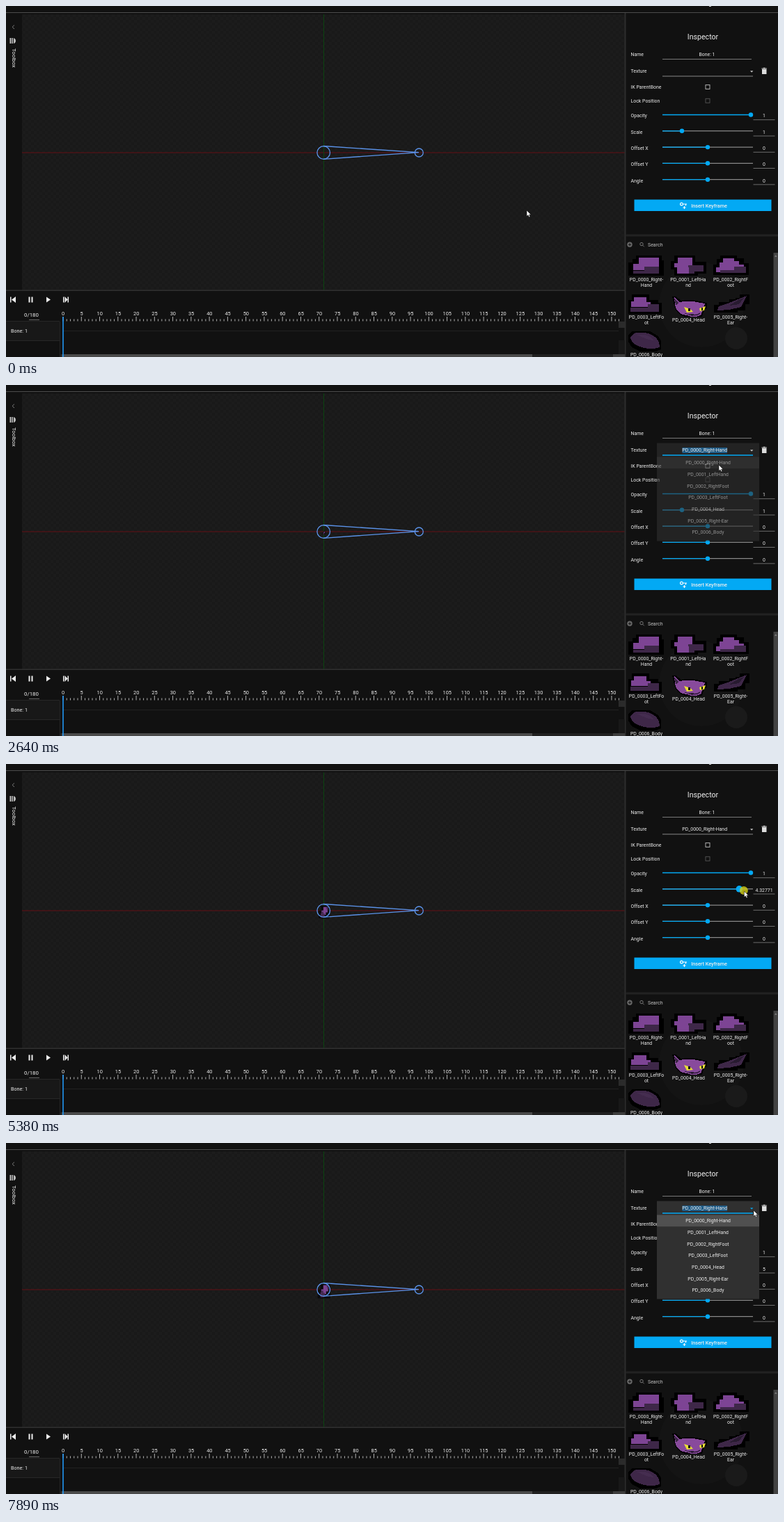
An HTML page for the animation above (8 s loop, 1109 by 505 pixels).

```html
<!DOCTYPE html>
<html lang="en">
<head>
<meta charset="utf-8">
<title>Bone editor</title>
<style>
html, body { margin: 0; width: 100%; height: 100%; overflow: hidden; background: #111; }
svg { display: block; width: 100vw; height: 100vh; font-family: Roboto, Arial, sans-serif; }
</style>
</head>
<body>
<svg id="stage" viewBox="0 0 1109 505">
  <defs>
    <pattern id="check" width="8" height="8" patternUnits="userSpaceOnUse">
      <path d="M0 0h8v8h-8z" fill="#1c1c1c"/>
      <path d="M0 0h4v4h-4zM4 4h4v4h-4z" fill="#191919"/>
    </pattern>
  </defs>
  <g id="view"></g>
  <g id="hand">
    <path d="M-9-2h4v-8h14v21h-18z" fill="#0b0a0c"/>
    <path d="M-4-2h3v-6h7v9h-3v4h-3v4h-5v-6h1z" fill="#7b4390"/>
    <path d="M-4 0h3v3h2v6h-6v-5h1zM4-8h3v6h-2v-3h-1z" fill="#442a50"/>
  </g>
  <g id="ui"></g>
  <g id="live"></g>
</svg>
<script>
const LOOP = 8000, BLUE = '#03a9f4', LIGHT = '#7d4494', DARK = '#3e2748';
const $ = id => document.getElementById(id);

const rect = (x, y, w, h, fill, more = '') =>
  `<rect x="${x}" y="${y}" width="${w}" height="${h}" fill="${fill}" ${more}/>`;
const circle = (x, y, r, fill, more = '') =>
  `<circle cx="${x}" cy="${y}" r="${r}" fill="${fill}" ${more}/>`;
const shape = (d, fill, more = '') => `<path d="${d}" fill="${fill}" ${more}/>`;
const line = (d, color, width = 1) => shape(d, 'none', `stroke="${color}" stroke-width="${width}"`);
const text = (s, x, y, size = 6.9, anchor = 'middle', more = '') =>
  `<text x="${x}" y="${y}" font-size="${size}" text-anchor="${anchor}" fill="#eee" ${more}>${s}</text>`;

const names = ['PD_0000_Right-Hand', 'PD_0001_LeftHand', 'PD_0002_RightFoot', 'PD_0003_LeftFoot',
  'PD_0004_Head', 'PD_0005_Right-Ear', 'PD_0006_Body'];

function slider(y, x, value, r = 3.2) {
  return line(`M943 ${y}H1073`, '#a5a5a5') + line(`M943 ${y}H${x}`, BLUE, 1.3) +
    circle(x, y, r, BLUE) + text(value, 1089, y + 3.8) + line(`M1073.5 ${y + 7.2}H1104.5`, '#777', .9);
}

function viewport() {
  return rect(23, 12, 866, 397, 'url(#check)') +
    line('M23 211H889', '#650f15') + line('M456.5 12V409', '#0b4510');
}

function frameAndTools() {
  return line('M0 9.5H1109', '#4c4c4c') + rect(1010, 0, 3, 1, '#ccc') +
    rect(888.5, 10, 2, 495, '#2d2d2d') + rect(0, 408.5, 889, 1.5, '#303030') +
    line('M12 27.5L9 30.3L12 33', '#777') +
    shape('M5.5 46h2v8h-2zM8.5 46h1.5v8h-1.5zM11 46q3 1 3 4t-3 4z', '#bbb') +
    text('Toolbox', 0, 0, 7.8, 'start', 'transform="translate(9 61) rotate(90)"');
}

function bone() {
  return line('M456 201.5L593 210.7L456 220.3', '#5b93ea', 1.3) +
    circle(456.2, 211, 9.3, 'none', 'stroke="#5b93ea" stroke-width="1.3"') +
    circle(593.3, 211, 6, 'none', 'stroke="#5b93ea" stroke-width="1.3"');
}

function timeline() {
  let out = shape('M6 418.5h1.5v8h-1.5zM14 418v9l-6-4.5zM32.5 418.5h2v8h-2zM36.5 418.5h2v8h-2z' +
    'M58 418.5v8l6-4zM82 418.5h1.5v8h-1.5zM84.5 418v9l4-4.5zM88.5 418.5h1.5v8h-1.5z', '#eee');
  let ticks = '';
  for (let i = 0; i <= 152; i++) {
    const x = 82 + i * 5.253;
    ticks += `M${x.toFixed(2)} ${i % 5 ? 450.5 : 447}V453.5`;
    if (i % 5 == 0 && i <= 150) out += text(i, x + .2, 445, 7.4);
  }
  return out + line(ticks, '#c4c4c4', .9) +
    text('0/180', 36.5, 447, 7.9) + line('M33 451.5H48', '#666') +
    rect(0, 454, 77, 27, '#181818') + line('M0 453.5H77M0 481.5H77', '#272727') +
    line('M77.5 454V505', '#242424') + text('Bone: 1', 7, 470, 7.2, 'start') +
    line('M82 467.5H880', '#222') +
    rect(880, 454, 9, 9, '#2b2b2b') + rect(880, 481, 9, 20, '#181818') +
    rect(78, 501, 811, 4, '#202020') + rect(80, 501, 676, 4, '#4a4a4a') +
    rect(872, 501, 17, 4, '#3c3c3c') + line('M82 447V505', '#2196f3', 1.6);
}

function inspector() {
  let out = text('Inspector', 1001, 48, 10.6);
  [['Name', 72], ['Texture', 96.3], ['IK ParentBone', 119], ['Lock Position', 138.7], ['Opacity', 160],
    ['Scale', 183.7], ['Offset X', 207], ['Offset Y', 230.3], ['Angle', 253.7]]
    .forEach(([s, y]) => out += text(s, 897.5, y, 6.95, 'start'));
  const box = (y, c) => rect(1005, y, 6, 6, 'none', `stroke="${c}" stroke-width=".9"`);
  out += text('Bone: 1', 1007, 72) + line('M943 76.5H1071', '#777') +
    shape('M1086 91h6.5v7h-6.5zM1085.5 89.5h2l.7-.8h2l.7.8h2v1h-7.4z', '#ddd') +
    box(113.5, '#bbb') + box(133.3, '#555') + slider(156.5, 1070, 1);
  [203.1, 226.3, 249.7].forEach(y => out += slider(y, 1008, 0));
  return out + rect(902.5, 278.5, 197, 16.5, BLUE) +
    text('Insert Keyframe', 1010, 289.7, 7.25, 'middle', 'font-weight="500"') +
    circle(970.5, 285, 1.9, 'none', 'stroke="#fff" stroke-width="1.2"') +
    line('M972.5 285H978M976.5 285V287.5M974.5 288V292M972.5 290H976.5', '#fff', 1.2);
}

// Each thumbnail: x, y, then pairs of blocky outlines and colours inside 51 x 30.
const art = [
  [894, 359, 'M15 3h29v13h-10v5h-27v-9h8z', LIGHT, 'M23 16h21v10h-37v-4h16z', DARK,
    'M0 0h51v30h-51z', 'M11 0h37v7h3v22h-51v-19h6v-5h5z'],
  [955, 359, 'M10 3h21v14h-5v9h-17v-9h-4v-6h5z', LIGHT, 'M25 14h22v9h-13v3h-8v-9h-1z', DARK, '',
    'M5 0h30v9h16v17h-12v3h-34v-9h-5v-12h5z'],
  [1016, 359, 'M14 4h16v4h7v5h7v5h-12v6h-28v-7h5v-7h5z', LIGHT, 'M30 16h17v9h-37v-4h20z', DARK, '',
    'M10 0h24v4h10v7h7v17h-51v-15h5v-8h5z'],
  [894, 414, 'M8 5h18v7h6v7h-28v-8h4z', LIGHT, 'M28 15h16v11h-41v-6h25z', DARK, '',
    'M5 1h25v8h13v4h5v16h-48v-20h5z'],
  [956, 418, 'M4 1l8 7q13-3 24 0l12 2-2 7-4 10q-9 4-20 0q-14-1-17-15z', '#884a9c',
    'M3 1l7 8-3 4zM17 24l20 2-8 2z', DARK, '', 'M1 0h5l8 6q11-2 21 0l16 3v8l-4 2-3 10h-25q-12-3-15-16z'],
  [1017, 414, 'M47 3l-8 16-17 4-17 1 2-6 15-5z', DARK, 'M35 9l8-3-7 9-14 2z', '#281b30', '',
    'M31 6h6v-5h14v14h-6v9h-11v3h-34v-11h7v-4h15v-4h9z'],
  [894, 467, 'M8 4q15-4 27 3q10 5 10 17q-11 4-26 0q-15-5-16-14z', DARK,
    'M12 6q17-2 25 8l-8-1z', '#452d50', '', 'M6 1h25l12 7 4 7v12l-7 3h-23l-12-6-5-8v-10z']
];

function assets() {
  let out = rect(890, 328.5, 219, 3, '#222') + circle(999, 430, 61, '#141414') + circle(1049, 478, 16, '#1a1a1a') +
    circle(896, 343.3, 3.7, '#666') + line('M894 343.3h4M896 341.3v4', '#151515') +
    circle(913, 342.6, 2.2, 'none', 'stroke="#777"') + line('M914.7 344.3l2 2', '#777') +
    text('Search', 922, 346, 7, 'start', 'opacity=".8"') +
    rect(1102.5, 355, 6.5, 150, '#424242') + shape('M1104 361l1.8-3 1.8 3z', '#777');
  for (const [x, y, a, ca, b, cb, , edge] of art)
    out += `<g transform="translate(${x} ${y})" shape-rendering="crispEdges">` +
      shape(edge, '#000') + shape(a, ca) + shape(b, cb) + '</g>';
  out += shape('M974 433l9 3 4 4-9 1zM996 435l9-3-2 6-6 1z', '#e9df35') +
    shape('M980 435h3v4h-3zM999 434h2v4h-2z', '#111') + line('M984 444q8 2 13-2', '#21142a', 1.4);
  [[920, 395.5, 'PD_0000_Right-', 'Hand'], [980, 395.5, 'PD_0001_LeftHa', 'nd'], [1041, 395.5, 'PD_0002_RightF', 'oot'],
    [920, 449.7, 'PD_0003_LeftFo', 'ot'], [980.5, 453.7, 'PD_0004_Head', ''], [1041, 449.7, 'PD_0005_Right-', 'Ear'],
    [920, 503.7, 'PD_0006_Body', '']]
    .forEach(([x, y, a, b]) => out += text(a, x, y) + text(b, x, y + 8.2));
  return out;
}

// Pointer stops: time, x, y
const stops = [[130, 748, 294], [770, 1066, 93], [960, 1066, 93], [1520, 1030, 97], [1760, 1024.5, 116],
  [1900, 1024, 115], [2880, 1024, 115], [3670, 973, 207], [3760, 964, 210], [3910, 966, 193], [4520, 978, 182],
  [4570, 978, 182], [5380, 1060.36, 183], [5780, 1099, 189], [6150, 1099, 189], [6940, 1028, 93],
  [7400, 1028, 93], [7750, 1074, 97]];

const ramp = (t, a, b) => Math.min(1, Math.max(0, (t - a) / (b - a)));

function pointerAt(t) {
  const i = stops.findIndex(s => s[0] > t);
  if (i < 1) return stops.at(i).slice(1);
  const [a, x, y] = stops[i - 1], [b, u, v] = stops[i];
  let k = ramp(t, a, b);
  k *= k * (3 - 2 * k);
  return [x + (u - x) * k, y + (v - y) * k];
}

function popup(alpha, active, color) {
  let out = rect(935, 83.5, 147, 141, '#303030');
  if (active) out += rect(935, 103.5, 147, 16.7, color);
  names.forEach((s, i) => out += text(s, 1008.5, 114.1 + i * 16.72));
  return `<g opacity="${alpha}">${out}</g>`;
}

function textureField(t, filled) {
  const focus = t > 960 && t < 3500 || t > 6980;
  const blueArrow = t > 960 && t < 2570 || t > 6980;
  let out = line('M943 101H1073', focus ? BLUE : '#888', focus ? 1.4 : 1) +
    shape('M1069 93.2h4.4l-2.2 2.3z', blueArrow ? BLUE : '#ccc');
  if (filled && focus) out += rect(971.5, 90, 64.5, 8, '#205c87');
  if (filled) out += text(names[0], 1003.7, 96.3);
  else if (t > 1000 && t < 1850) out += line('M1003.7 90V98', '#999', .8);
  return out;
}

function render(t) {
  const [x, y] = pointerAt(t);
  const filled = t >= 2400, drag = t >= 4540 && t < 5780;
  const scale = t < 4570 ? 1 : t > 5780 ? 5 : Math.min(5, Math.max(1, (x - 953.25) / 24.75));
  const alpha = t < 4000 ? ramp(t, 960, 1060) * (1 - ramp(t, 2570, 2740)) : ramp(t, 7780, 7885);

  $('hand').setAttribute('transform', `translate(456.8 212.6) scale(${scale / 5})`);
  $('hand').setAttribute('visibility', filled ? 'visible' : 'hidden');

  let out = slider(179.8, 946.25 + 24.75 * scale, +scale.toFixed(5), drag ? 4.8 : 3.2);
  if (alpha) out += popup(alpha, y > 104 || t > 7000, t > 7000 ? '#505050' : '#434343');
  out += textureField(t, filled);
  if (drag) out += circle(x - .5, y - 1, 6, '#d6cf16', 'opacity=".8"');

  const beam = !alpha && x > 943 && x < 1060 && y > 87 && y < 101;
  out += `<g transform="translate(${x} ${y})">` + (beam
    ? line('M-2-4.5H2M0-4.5V4.5M-2 4.5H2', '#ddd', .9)
    : shape('M0 0V8.6L2 6.8L3.4 9.8L4.9 9.1L3.5 6.2H6.2Z', '#fff', 'stroke="#000" stroke-width=".5"')) + '</g>';
  $('live').innerHTML = out;
}

$('view').innerHTML = viewport();
$('ui').innerHTML = bone() + frameAndTools() + timeline() + inspector() + assets();

const start = performance.now();
function tick() {
  render((performance.now() - start) % LOOP);
  requestAnimationFrame(tick);
}
tick();
</script>
</body>
</html>
```
